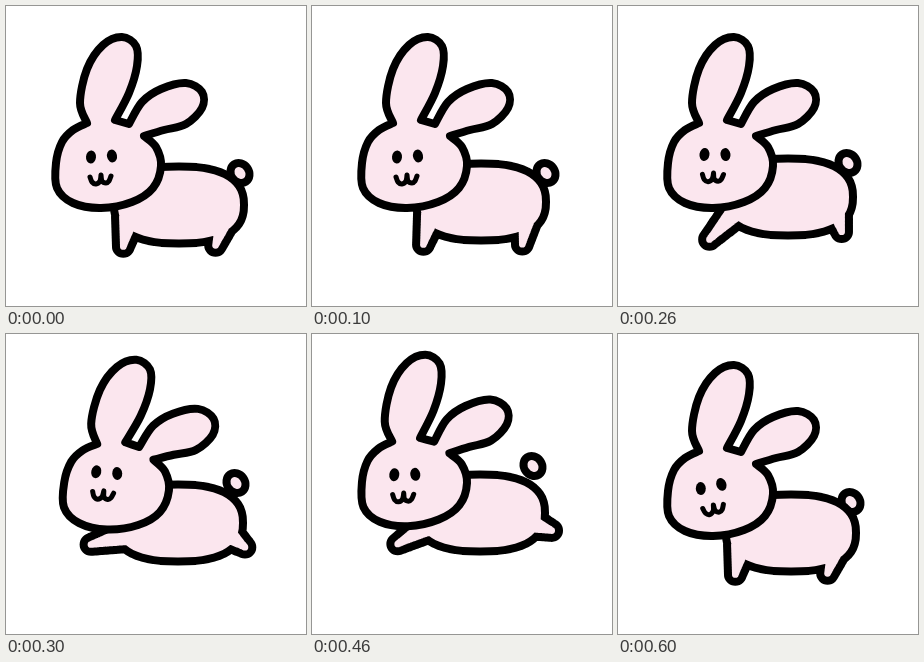
These frames come from a looping animation (300x300 px, 0.7 s). An HTML page with a canvas:

```html
<!DOCTYPE html>
<html lang="en">
<head>
<meta charset="utf-8">
<title>Hopping rabbit</title>
<style>
html, body { margin: 0; width: 100%; height: 100%; overflow: hidden; background: #fff; }
canvas { display: block; }
</style>
</head>
<body>
<canvas id="stage" width="300" height="300"></canvas>
<script>
const ctx = document.getElementById('stage').getContext('2d');
const PINK = '#fbe6ee', LINE = 8, STEP = 100;

// Each pose places rigid parts; head and face also turn (radians).
// The face is placed relative to the head's centre.
const rest = {
  head: [104, 160, 0], face: [-9, 0, 0], tail: [234, 167],
  body: [173, 199], fore: [117, 242], hind: [209, 241]
};
const poses = [
  rest,
  { ...rest, body: [169, 196], fore: [111, 240], hind: [210, 240] },
  { ...rest, face: [-8, -2, .05], tail: [230, 157], body: [170, 191], fore: [90, 235], hind: [224, 227] },
  { head: [112, 154, .05], face: [-13, -6, .13], tail: [230, 149], body: [172, 189], fore: [83, 211], hind: [240, 214] },
  { head: [104, 150, -.02], face: [-12, 0, .03], tail: [221, 132], body: [168, 179], fore: [84, 211], hind: [241, 197] },
  { head: [109, 164, -.12], face: [-12, -3, -.12], tail: [226, 128], body: [176, 182], fore: [99, 227], hind: [218, 220] },
  { ...rest, face: [-10, 2, -.15], tail: [233, 168] }
];

// Smooth curve through points; "/" starts a new run with a sharp corner.
function curve(text) {
  const path = new Path2D();
  text.split(' / ').forEach((run, r) => {
    const pts = run.split(' ').map(p => p.split(',').map(Number));
    const at = i => pts[Math.max(0, Math.min(pts.length - 1, i))];
    if (!r) path.moveTo(...pts[0]);
    for (let i = 0; i < pts.length - 1; i++) {
      const [a, b, c, d] = [at(i - 1), at(i), at(i + 1), at(i + 2)];
      path.bezierCurveTo(
        b[0] + (c[0] - a[0]) / 6, b[1] + (c[1] - a[1]) / 6,
        c[0] - (d[0] - b[0]) / 6, c[1] - (d[1] - b[1]) / 6, ...c);
    }
  });
  return path;
}

const headShape = curve(
  '-23,-43 -30,-63 -23,-97 -7,-121 12,-129 26,-120 27,-100 19,-73 5,-46 / ' +
  '5,-46 19,-42 / ' +
  '19,-42 32,-64 51,-77 76,-83 92,-74 92,-58 76,-42 54,-36 34,-30 / ' +
  '34,-30 46,-19 51,0 43,22 22,36 -9,42 -37,37 -53,22 -54,-3 -48,-24 -37,-36 -23,-43');
const smile = curve('-11,11 -9,16 -5,18 -1,15 0,9 / 0,9 1,15 5,17 8,15 10,10');

// Torso and tapering legs merge into one silhouette, sized to the line's inner edge.
function bodyShape([x, y], fore, hind) {
  const path = new Path2D();
  const bulge = v => Math.sign(v) * Math.abs(v) ** .8;
  for (let i = 0; i < 60; i++) {
    const a = i * Math.PI / 30;
    path.lineTo(x + 61 * bulge(Math.cos(a)), y + 34.5 * bulge(Math.sin(a)));
  }
  path.closePath();
  const leg = (hx, hy, [fx, fy]) => {
    for (let t = 0; t <= 1; t += .05) {
      const r = 10 - 7 * t, cx = hx + (fx - hx) * t, cy = hy + (fy - hy) * t;
      path.moveTo(cx + r, cy);
      path.arc(cx, cy, r, 0, 7);
    }
  };
  leg(x - 50, y + 12, fore);
  leg(x + 47, y + 9, hind);
  return path;
}

function oval(x, y, rx, ry, turn = 0) {
  const path = new Path2D();
  path.ellipse(x, y, rx, ry, turn, 0, 7);
  return path;
}

function place([x, y, turn], paint) {
  ctx.save();
  ctx.translate(x, y);
  ctx.rotate(turn);
  paint();
  ctx.restore();
}

function ink(path, width = LINE) {
  ctx.lineWidth = width;
  ctx.stroke(path);
}

function draw({ head, face, tail, body, fore, hind }) {
  ctx.fillStyle = '#fff';
  ctx.fillRect(0, 0, 300, 300);
  ctx.strokeStyle = '#000';
  ctx.lineCap = ctx.lineJoin = 'round';

  ctx.fillStyle = PINK;
  const tuft = oval(...tail, 9, 10.5, -.6), trunk = bodyShape(body, fore, hind);
  ctx.fill(tuft);
  ink(tuft);
  ink(trunk, 2 * LINE);
  ctx.fill(trunk);
  place(head, () => {
    ctx.fill(headShape);
    ink(headShape);
  });

  ctx.fillStyle = '#000';
  place([head[0] + face[0], head[1] + face[1], face[2]], () => {
    ctx.fill(oval(-10, -9, 5, 6.5, .1));
    ctx.fill(oval(11, -10, 5, 6.5, -.2));
    ink(smile, 5);
  });
}

function tick() {
  draw(poses[Math.floor(performance.now() / STEP) % poses.length]);
  requestAnimationFrame(tick);
}
tick();
</script>
</body>
</html>
```
